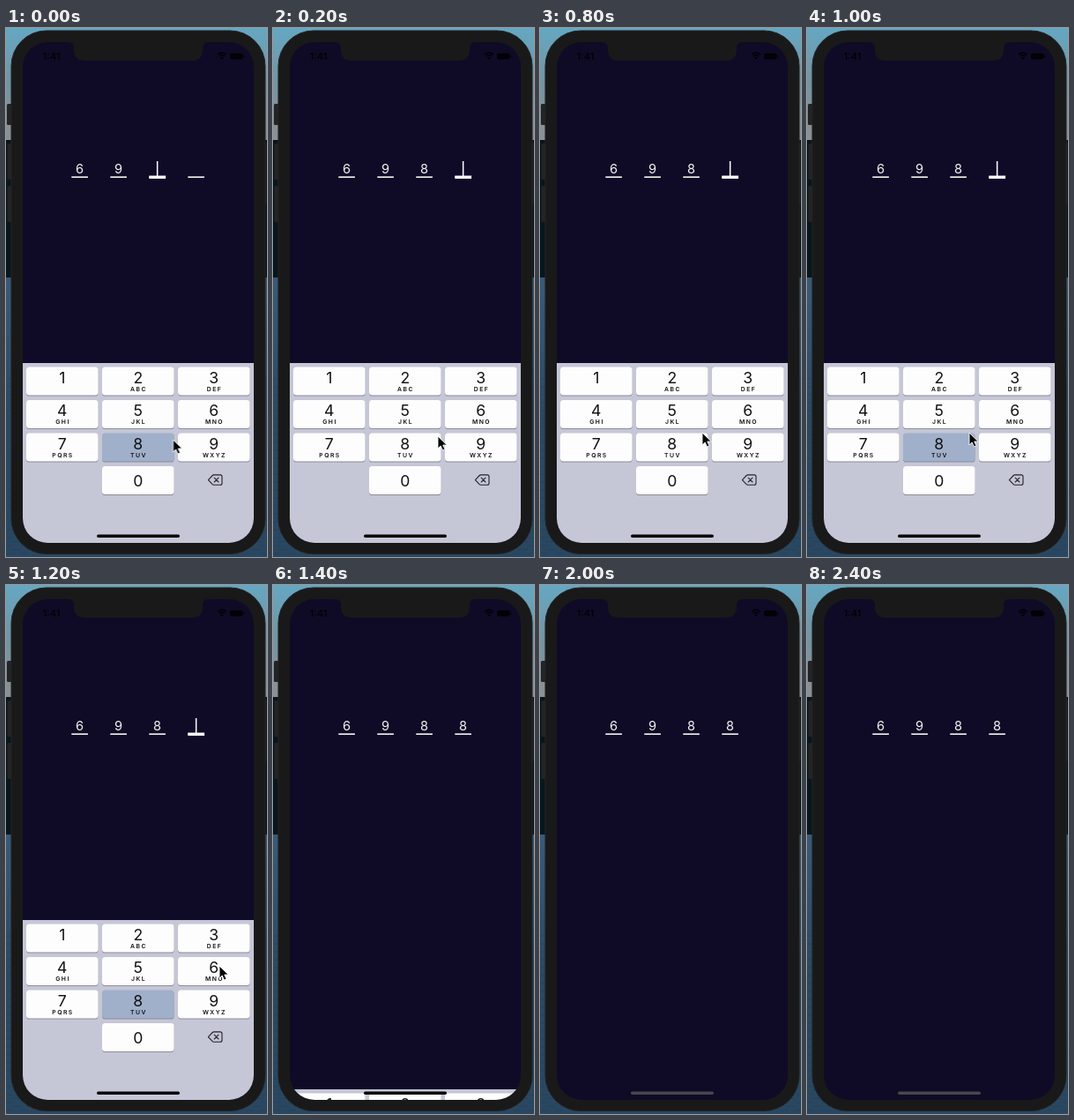
These frames come from a looping animation (296x600 px, 2600 ms). An HTML page:

```html
<!DOCTYPE html>
<html lang="en">
<head>
<meta charset="utf-8">
<title>Passcode entry</title>
<style>
html, body { margin: 0; width: 100%; height: 100%; overflow: hidden; background: #2d4c66; }
svg { display: block; width: 100vw; height: 100vh; }
text { font-family: Inter, "Liberation Sans", Arial, sans-serif; text-anchor: middle; }
.code { font-size: 14.6px; fill: #f4f3f1; }
.digit { font-size: 17.6px; fill: #111; }
.letters { font-size: 6.8px; font-weight: 600; letter-spacing: 1.5px; fill: #111; }
.time { font-size: 11px; font-weight: 600; }
.key { fill: #fdfdfe; }

.anim { animation: 2.6s step-end infinite; }
#third { animation-name: third; }
#fourth { animation-name: fourth; }
#active { animation-name: active; }
#pad { animation-name: pad; }
#pointer { animation-name: pointer; }
#home { animation-name: home; }
.pressable { animation-name: press; }

@keyframes third { 0% { opacity: 0 } 7.69%, 100% { opacity: 1 } }
@keyframes fourth { 0% { opacity: 0 } 53.84%, 100% { opacity: 1 } }
@keyframes active {
  0% { transform: translateX(0); opacity: 1 }
  7.69% { transform: translateX(44px); opacity: 1 }
  53.84%, 100% { transform: translateX(44px); opacity: 0 }
}
@keyframes pad {
  0% { transform: translateY(0) }
  53.84% { transform: translateY(192px) }
  61.53%, 100% { transform: translateY(210px) }
}
@keyframes pointer {
  0% { transform: translate(189.5px, 467px); opacity: 1 }
  7.69% { transform: translate(187px, 463px); opacity: 1 }
  15.38% { transform: translate(184px, 459px); opacity: 1 }
  46.15% { transform: translate(242px, 432px); opacity: 1 }
  53.84%, 100% { transform: translate(242px, 432px); opacity: 0 }
}
@keyframes home { 0% { fill: #050507 } 61.53%, 100% { fill: #48474c } }
@keyframes press {
  0% { fill: #a0b0cb }
  7.69% { fill: #fdfdfe }
  38.46% { fill: #a0b0cb }
  53.84%, 100% { fill: #fdfdfe }
}
</style>
</head>
<body>
<svg viewBox="0 0 296 600" preserveAspectRatio="none">
  <defs>
    <linearGradient id="sky" x1="0" y1="0" x2="0" y2="1">
      <stop offset="0" stop-color="#65a7c2"/>
      <stop offset=".5" stop-color="#7594a2"/>
      <stop offset="1" stop-color="#8e9094"/>
    </linearGradient>
    <linearGradient id="sea" x1="0" y1="0" x2="0" y2="1">
      <stop offset="0" stop-color="#3a5a76"/>
      <stop offset=".5" stop-color="#2c4961"/>
      <stop offset="1" stop-color="#2a4761"/>
    </linearGradient>
    <pattern id="ripple" width="17" height="9" patternUnits="userSpaceOnUse">
      <path d="M0 2h9M6 6.5h11" stroke="#172d42" stroke-width=".8" opacity=".35"/>
    </pattern>
    <clipPath id="screen"><rect x="19" y="16" width="262" height="568" rx="28"/></clipPath>
  </defs>

  <rect width="296" height="128" fill="url(#sky)"/>
  <rect y="127" width="296" height="157" fill="#08161d"/>
  <rect y="283" width="296" height="317" fill="url(#sea)"/>
  <rect y="390" width="296" height="210" fill="url(#ripple)"/>

  <g fill="#232425">
    <rect x="1" y="86" width="7" height="24" rx="1.5"/>
    <rect x="1.5" y="131" width="6" height="41" rx="1.5"/>
    <rect x="1.5" y="179" width="6" height="41" rx="1.5"/>
    <rect x="292" y="130" width="3.5" height="70" rx="1.5"/>
  </g>
  <rect x="6" y="3" width="288" height="593.5" rx="40" fill="#191919" stroke="#242424"/>

  <g clip-path="url(#screen)">
    <rect x="19" y="16" width="262" height="568" fill="#0f0b27"/>

    <g class="code">
      <text x="83.5" y="165.4">6</text>
      <text x="127.5" y="165.4">9</text>
      <text id="third" class="anim" x="171.5" y="165.4">8</text>
      <text id="fourth" class="anim" x="215.5" y="165.4">8</text>
    </g>
    <path d="M74.3 169.2h18.6m25.4 0h18.6m25.4 0h18.6m25.4 0h18.6" stroke="#e5e4df" stroke-width="1.8"/>
    <g id="active" class="anim" fill="#fff">
      <rect x="162.3" y="167.5" width="18.8" height="3.4"/>
      <rect x="170.9" y="151" width="1.5" height="17"/>
    </g>

    <g id="pad" class="anim">
      <rect x="19" y="380" width="262" height="206" fill="#c5c6d6"/>
      <g id="keys"></g>
      <g fill="none" stroke="#22222a" stroke-width="1.1" stroke-linejoin="round" stroke-linecap="round">
        <path d="M229.4 512.6l4.8-5.1q.6-.6 1.4-.6h7.4q2 0 2 2v7.4q0 2-2 2h-7.4q-.8 0-1.4-.6z"/>
        <path d="M236.2 510.2l4.8 4.8m0-4.8l-4.8 4.8"/>
      </g>
    </g>
    <rect id="home" class="anim" x="103" y="574.6" width="94" height="3.5" rx="1.75"/>
  </g>

  <path fill="#191919" d="M70 14v2q7 0 7 7v2q0 12 12 12h122q12 0 12-12v-2q0-7 7-7v-2z"/>

  <g fill="#020205">
    <text class="time" x="51.5" y="36.3">1:41</text>
    <path d="M245 36l-1.9-2.2q1.9-1.6 3.8 0z"/>
    <path d="M241.8 32.2q3.2-2.7 6.4 0M240 30.2q5-4.2 10 0" fill="none" stroke="#020205" stroke-width="1.5"/>
    <rect x="254" y="28.8" width="14.6" height="6.8" rx="2"/>
    <rect x="269.2" y="31" width="1.1" height="2.5" rx=".5"/>
  </g>

  <path id="pointer" class="anim" d="M0 0v14l3.2-3 2.2 5 2.6-1.1-2.2-4.9h4.5z"
    fill="#050505" stroke="#fff" stroke-width=".9" stroke-linejoin="round"/>
</svg>
<script>
const letters = { 2: "ABC", 3: "DEF", 4: "GHI", 5: "JKL", 6: "MNO", 7: "PQRS", 8: "TUV", 9: "WXYZ" };

function drawKey(digit, col, row) {
  const x = 23 + col * 86, y = 384.4 + row * 37.5, mid = x + 40.8;
  const cls = digit === 8 ? "key anim pressable" : "key";
  const label = letters[digit]
    ? `<text class="letters" x="${mid + 0.7}" y="${y + 27.3}">${letters[digit]}</text>` : "";
  return `<rect x="${x}" y="${y + 0.9}" width="81.6" height="32.2" rx="3.6" fill="#8c8d99"/>
    <rect class="${cls}" x="${x}" y="${y}" width="81.6" height="32.2" rx="3.6"/>
    <text class="digit" x="${mid}" y="${y + (digit ? 18.2 : 22.6)}">${digit}</text>${label}`;
}

let keys = drawKey(0, 1, 3);
for (let n = 1; n <= 9; n++) keys += drawKey(n, (n - 1) % 3, Math.floor((n - 1) / 3));
document.getElementById("keys").innerHTML = keys;
</script>
</body>
</html>
```
